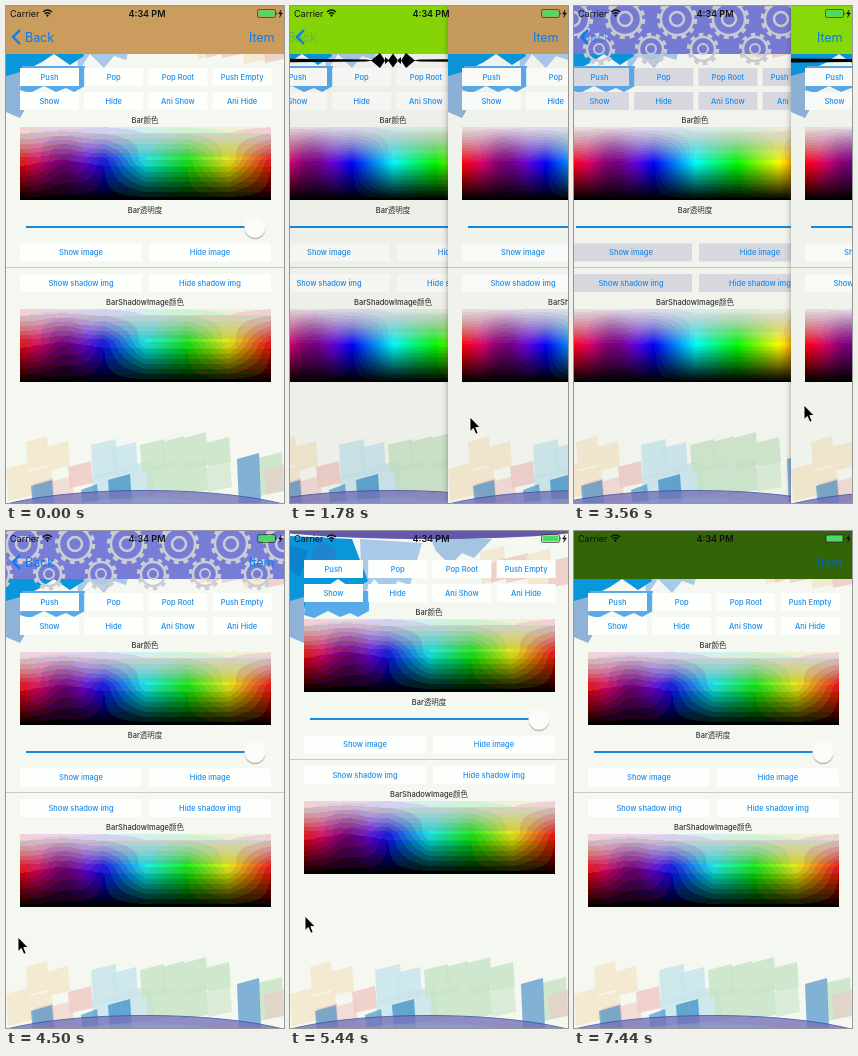
Write an HTML page with a canvas that moves like this. It is 278 px wide and 497 px high and loops after 7.68 s.

```html
<!DOCTYPE html>
<html lang="zh-CN">
<head>
<meta charset="utf-8">
<style>
html, body { margin: 0; height: 100%; overflow: hidden; background: #f5f8f1; }
#stage { position: relative; width: 278px; height: 497px; overflow: hidden; }
#stage svg, .page { position: absolute; left: 0; top: 0; width: 278px; height: 497px; }
.page { background: #f5f8f1; box-shadow: 0 0 6px rgba(60, 60, 40, .45); }
.page canvas { position: absolute; left: 14px; }
.dim { position: absolute; inset: 0; background: #1a1400; }
.fine, .moving .coarse { visibility: hidden; }
.moving .fine { visibility: inherit; }
text { font: 500 7.5px Inter, "Noto Sans CJK SC", "Noto Sans CJK", sans-serif; text-anchor: middle; }
.link { fill: #1c8cec; }
.label { fill: #333; }
.nav { font-size: 12.6px; font-weight: 400; fill: #087cf0; text-anchor: start; letter-spacing: -.1px; }
.status { font-size: 9px; fill: #111; }
</style>
</head>
<body>
<div id="stage"></div>
<script>
const W = 278, LOOP = 7680, STEP = 118.1;
const stage = document.getElementById('stage');
const svg = (body, attrs = '') => `<svg viewBox="0 0 278 497" ${attrs}>${body}</svg>`;
const text = (x, y, str, cls) => `<text x="${x}" y="${y + 2.7}" class="${cls}">${str}</text>`;
const poly = (color, points, opacity = 1) =>
  `<polygon fill="${color}" points="${points}" opacity="${opacity}"/>`;
const slab = (x, y, w, h, color, opacity = .85) =>
  poly(color, `${x},${y + 6} ${x + w},${y} ${x + w + 2},${y + h - 5} ${x + 2},${y + h}`, opacity);

// Watercolour backdrop
function backdrop() {
  const cream = '#f3e7cb', pink = '#efcac6', sky = '#c8e5ec', mint = '#c8e4c7', blue = '#3d8fc7';
  return [
    poly('#a9c9ea', '70,8 132,12 120,54 108,50 98,62 84,48 72,66'),
    poly('#8fb9df', '140,6 202,8 184,27 172,22 160,34 146,20', .8),
    slab(190, 15, 24, 38, cream), slab(214, 22, 24, 30, pink), slab(236, 18, 24, 40, cream),
    slab(257, 25, 24, 32, pink), slab(199, 27, 16, 25, pink),
    poly('#0a96db', '0,5 62,8 78,50 64,59 48,48 36,56 20,64 14,78 0,86'),
    poly('#59aaea', '16,60 79,60 79,80 68,86 60,82 50,86 38,80 24,87 14,84'),
    poly('#8fb2d9', '0,70 14,66 14,90 22,98 14,112 0,106'),
    poly('#2f79c4', '30,8 48,20 36,44 20,26', .6),
    poly('#0871bd', '0,14 18,20 10,46 0,40', .5),
    '<ellipse cx="139" cy="-9" rx="190" ry="17" fill="#4c3da0" opacity=".85"/>',
    slab(0, 457, 22, 38, cream), slab(20, 430, 21, 34, cream), slab(40, 435, 22, 30, cream),
    slab(19, 460, 26, 30, cream), slab(27, 472, 20, 30, pink), slab(62, 455, 23, 27, pink),
    slab(44, 470, 22, 28, pink, .6), slab(85, 433, 25, 40, sky), slab(106, 436, 24, 34, sky),
    slab(86, 464, 28, 34, sky), slab(114, 455, 32, 38, sky), slab(134, 433, 24, 34, mint),
    slab(156, 430, 22, 32, mint), slab(178, 426, 22, 38, mint), slab(200, 431, 23, 30, mint),
    slab(140, 456, 30, 34, mint), slab(170, 453, 30, 36, mint), slab(200, 456, 24, 30, mint, .6),
    slab(252, 446, 24, 44, mint), slab(258, 458, 22, 30, pink, .6),
    slab(231, 447, 22, 55, '#6ea5d0'), slab(25, 474, 21, 30, blue, .65),
    slab(75, 478, 16, 24, blue, .65), slab(102, 468, 22, 34, blue, .75),
    '<ellipse cx="139" cy="521" rx="178" ry="36.5" fill="#7773bb" stroke="#354aa2" opacity=".8"/>',
    '<ellipse cx="139" cy="528" rx="130" ry="36" fill="#8ba0c8" opacity=".6"/>'
  ].join('');
}

function controls(buttonColor) {
  const button = (x, y, w, label) =>
    `<rect x="${x}" y="${y - 9}" width="${w}" height="18" fill="${buttonColor}"/>` +
    text(x + w / 2, y, label, 'link');
  const row = (y, labels) => labels.map((s, i) => button(14 + 64.2 * i, y, 59, s)).join('');
  const pair = (y, labels) => labels.map((s, i) => button(14 + 129 * i, y, 122, s)).join('');
  return row(71, ['Push', 'Pop', 'Pop Root', 'Push Empty']) +
    row(95, ['Show', 'Hide', 'Ani Show', 'Ani Hide']) +
    pair(246.5, ['Show image', 'Hide image']) +
    pair(277, ['Show shadow img', 'Hide shadow img']) +
    text(139, 114.5, 'Bar颜色', 'label') + text(139, 204.5, 'Bar透明度', 'label') +
    text(139, 296.5, 'BarShadowImage颜色', 'label') +
    '<path d="M20 221H240" stroke="#168ae0" stroke-width="2"/>' +
    '<circle cx="249" cy="223" r="10.5" fill="#c6c8c6"/><circle cx="249" cy="221" r="10.5" fill="#fbfcfa"/>' +
    '<path d="M0 261.5H278" stroke="#c9cbc6"/>';
}

function gears() {
  let out = '';
  const ring = (x, y, r, w, dash = '') =>
    `<circle cx="${x}" cy="${y}" r="${r}" stroke-width="${w}" stroke-dasharray="${dash}"/>`;
  for (let i = 0; i < 7; i++) {
    const x = 17 + 52 * i;
    out += ring(x, 13, 16, 2.5) + ring(x, 13, 18.5, 3.5, '5 4.7') + ring(x, 13, 7, 2.5) +
      ring(x - 26, 43, 12, 2.5) + ring(x - 26, 43, 14.5, 3.5, '4.5 4.6') + ring(x - 26, 43, 5, 2);
  }
  return `<g fill="none" stroke="#cbcdd2">${out}</g>`;
}

const ornament = '<path d="M0 52.5L112 53.5 119 54.5 112 55.5 0 56.5ZM278 52.5L166 53.5 159 54.5 166 55.5 278 56.5Z' +
  'M117 54.5L126 47 131 54.5 126 62ZM161 54.5L152 47 147 54.5 152 62Z' +
  'M139 47.5L144 54.5 139 61.5 134 54.5ZM131 51L135 54.5 131 58ZM147 51L143 54.5 147 58Z"/>';

// Hue across, white through full colour to black downwards, in flat steps
function colourMap(levelStep, sat, mid) {
  const map = Object.assign(document.createElement('canvas'), { width: 251, height: 73 });
  const ctx = map.getContext('2d'), img = ctx.createImageData(251, 73);
  for (let y = 0, p = 0; y < 73; y++) for (let x = 0; x < 251; x++, p += 4) {
    const v = 1 - y / 72, top = Math.max(0, v * 2 - 1);
    const light = v > .5 ? mid + (.9 - mid) * top : mid * v * 2;
    const s = sat * (1 - .75 * top), hue = 360 * (1 - x / 250);
    const shade = 1 - .5 * Math.exp(-(((x - 42) / 20) ** 2)) * (1 - top);
    [0, 8, 4].forEach((n, c) => {
      const k = (n + hue / 30) % 12;
      const value = light - s * Math.min(light, 1 - light) * Math.max(-1, Math.min(k - 3, 9 - k, 1));
      img.data[p + c] = Math.round(value * shade * 255 / levelStep) * levelStep;
    });
    img.data[p + 3] = 255;
  }
  ctx.putImageData(img, 0, 0);
  return map;
}
const maps = { coarse: colourMap(30, .86, .45), fine: colourMap(17, 1, .49) };

const pages = [
  { bar: '#ca9c5e' },
  { bar: '#89dc08', extra: ornament },
  { bar: '#777cd6', extra: gears(), pressed: '#dadae4' },
  { bar: 'none', shift: -33 },
  { bar: '#336405' }
].map(({ bar, extra = '', shift = 0, pressed = '#fdfffc' }, i) => {
  const el = document.createElement('div');
  el.className = 'page';
  el.style.zIndex = 20 - 2 * i;
  const draw = color => backdrop() + `<g transform="translate(0 ${shift})">${controls(color)}</g>` +
    `<rect width="278" height="48" fill="${bar}"/><svg height="64">${extra}</svg>`;
  el.innerHTML = svg(draw('#fdfffc'), 'class="coarse"') + svg(draw(pressed), 'class="fine"');
  for (const [name, map] of Object.entries(maps)) for (const y of [121, 303]) {
    const copy = Object.assign(document.createElement('canvas'), { width: 251, height: 73, className: name });
    copy.getContext('2d').drawImage(map, 0, 0);
    copy.style.top = y + shift + 'px';
    el.append(copy);
  }
  const dim = document.createElement('div');
  dim.className = 'dim';
  el.append(dim);
  stage.append(el);
  return { el, dim };
});

stage.insertAdjacentHTML('beforeend',
  svg('<path id="chevron" d="M14 24L7 31 14 38" fill="none" stroke="#087cf0" stroke-width="2.3"/>' +
    '<text id="oldBack" class="nav" y="35.5">Back</text><text id="newBack" class="nav" y="35.5">Back</text>' +
    '<text id="item" class="nav" x="243" y="35.5">Item</text>', 'id="nav" style="z-index:30"') +
  svg('<text class="status" x="4" y="10.6" style="text-anchor:start;font-weight:400">Carrier</text>' +
    '<text class="status" x="141" y="10.6" style="font-weight:600">4:34 PM</text>' +
    '<path d="M37 6Q41.5 2 46 6M38.8 8Q41.5 5.6 44.2 8" fill="none" stroke="#111" stroke-width="1.3"/>' +
    '<circle cx="41.5" cy="9.6" r="1.1"/>' +
    '<rect x="251.5" y="3.5" width="18" height="8" rx="1.5" fill="none" stroke="#333" stroke-width=".7"/>' +
    '<rect x="252.5" y="4.5" width="16" height="6" rx=".7" fill="#4cd964"/>' +
    '<path d="M270.5 6v3M275 4L272.5 8H274.5L273.5 11.5 276.5 7H274.5Z" stroke="#222" stroke-width=".4"/>',
    'style="z-index:31"') +
  svg('<path id="cursor" d="M0 0V14.5L3.3 11.5 5.8 17.3 8.2 16.2 5.8 10.6H10.2Z" stroke="#fff" stroke-width=".9"/>',
    'style="z-index:32"'));
const [nav, chevron, oldBack, newBack, item, cursor] =
  ['nav', 'chevron', 'oldBack', 'newBack', 'item', 'cursor'].map(id => document.getElementById(id));

// Keys: tick, then values. Scroll counts 278 px for each page popped.
const scrollKeys = [[0, 0], [7, 0], [15, 158], [16, 235], [17, 278], [23, 278], [24, 300], [25, 366],
  [29, 480], [30, 495], [31, 540], [32, 556], [38, 556], [41, 771], [42, 818], [43, 834],
  [49, 834], [50, 845], [56, 1013], [57, 1080], [58, 1112], [64, 1112]];
const cursorKeys = [[1, 168, 425], [3, 134, 423], [4, 134, 423], [7, 12, 413], [15, 180, 411],
  [16, 190, 412], [18, 46, 401], [19, 32, 397], [22, 3, 391], [23, 3, 391], [24, 38, 394], [25, 105, 396],
  [30, 230, 399], [32, 225, 401], [37, 16, 407], [38, 12, 406], [41, 225, 400], [42, 222, 398],
  [44, 46, 390], [45, 31, 389], [46, 15, 385], [48, 5, 384], [49, 5, 384], [56, 221, 392],
  [58, 239, 461], [60, 239, 461], [63, 282, 500], [64, 282, 500]];

function track(keys, t) {
  let i = 0;
  while (i < keys.length - 2 && keys[i + 1][0] <= t) i++;
  const a = keys[i], b = keys[i + 1], f = (t - a[0]) / (b[0] - a[0]);
  return a.slice(1).map((v, n) => v + (b[n + 1] - v) * f);
}

function place(label, x, opacity) {
  label.setAttribute('x', x);
  label.setAttribute('opacity', opacity);
}

function frame() {
  const tick = Math.min(63, Math.floor((performance.now() % LOOP + 4) / STEP));
  const [scroll] = track(scrollKeys, tick);
  const top = Math.floor(scroll / W), off = scroll - top * W, part = off / W;
  stage.classList.toggle('moving', off > 0);
  pages.forEach(({ el, dim }, i) => {
    const under = i === top + 1;
    el.style.visibility = i === top || (under && off > 0) ? 'visible' : 'hidden';
    el.style.transform = `translateX(${Math.round(under ? (off - W) * .3 : off)}px)`;
    dim.style.opacity = under ? .08 * (1 - part) : off > 0 ? .02 : 0;
  });

  nav.style.transform = `translateX(${top === 2 ? off : top === 3 ? off - W : 0}px)`;
  chevron.style.visibility = top < 3 ? 'visible' : 'hidden';
  item.style.fill = top > 2 ? '#0668b8' : '';
  if (top < 2) {
    place(oldBack, 19 + 80 * part, Math.max(0, 1 - 2.6 * part));
    place(newBack, 19 - 50 * (1 - part), part * part);
  } else {
    place(oldBack, 19, top === 2 ? 1 : 0);
    place(newBack, 19, 0);
  }

  const [x, y] = track(cursorKeys, tick);
  cursor.setAttribute('transform', `translate(${x} ${y})`);
  cursor.style.visibility = tick > 0 ? 'visible' : 'hidden';
  requestAnimationFrame(frame);
}
frame();
</script>
</body>
</html>
```
